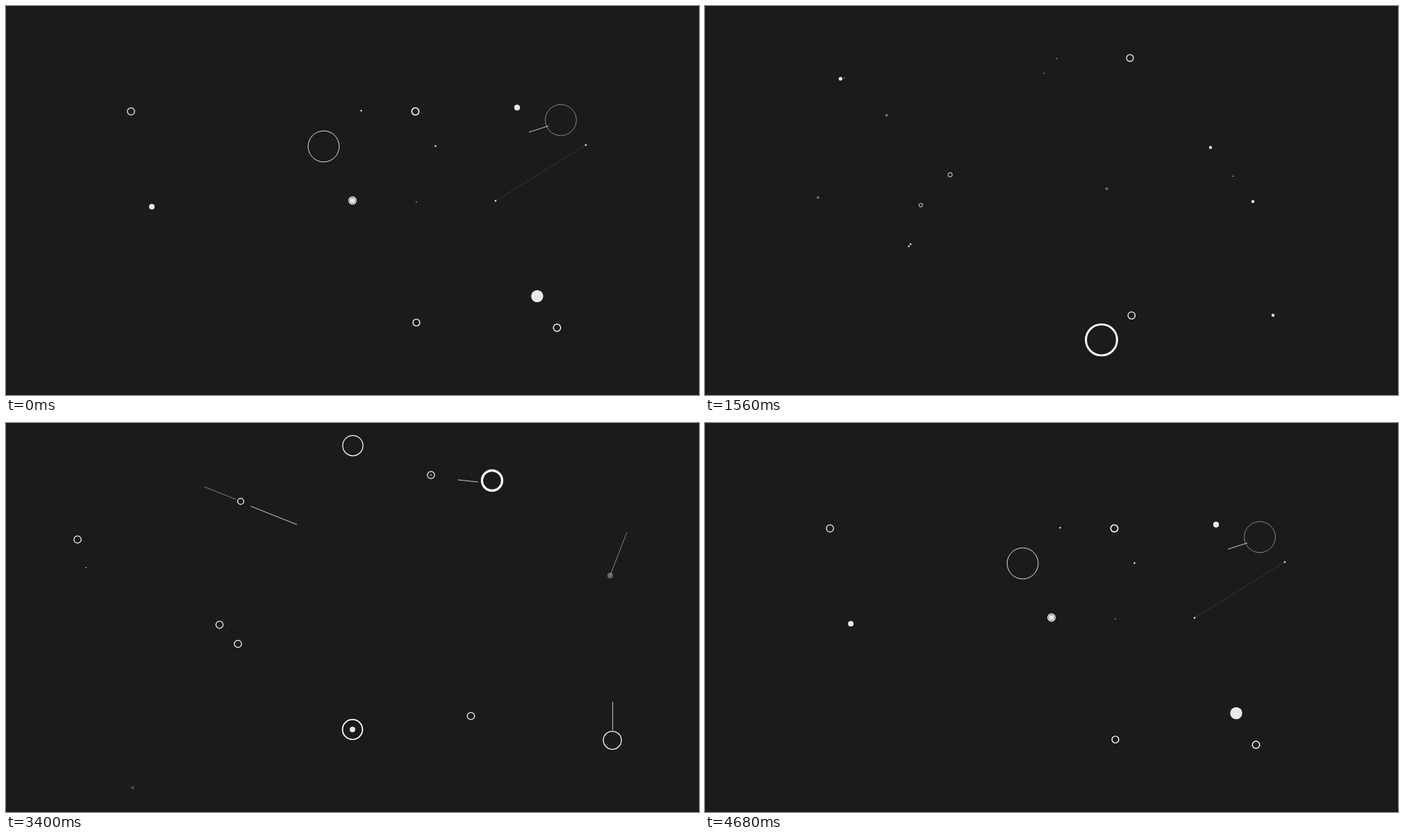
These frames come from a looping animation (998 by 561 pixels, 4.72 s). An HTML page with a canvas:

```html
<!DOCTYPE html>
<html>
<head>
<meta charset="utf-8">
<style>
html, body { margin: 0; height: 100%; overflow: hidden; background: #1b1b1b; }
canvas { display: block; }
</style>
</head>
<body>
<canvas id="stage" width="998" height="561"></canvas>
<script>
const ctx = document.getElementById('stage').getContext('2d');
const STEP = 40, FADE = 120;
// Beats of the loop, in ms
const A = 0, B = 360, C = 1040, D = 1640, E = 2040, END = 2320;
const shapes = [];

const smooth = v => {
  const u = Math.min(1, Math.max(0, v));
  return u * u * (3 - 2 * u);
};
const mix = (a, b, u) => a + (b - a) * u;

function disc(x, y, r, alpha) {
  ctx.beginPath();
  ctx.arc(x, y, r, 0, 2 * Math.PI);
  ctx.globalAlpha = alpha;
  ctx.fillStyle = '#e9e9e9';
  ctx.fill();
}

function hoop(x, y, r, width) {
  if (width < 0.02) return;
  ctx.beginPath();
  ctx.arc(x, y, r, 0, 2 * Math.PI);
  ctx.globalAlpha = 1;
  ctx.strokeStyle = '#fff';
  ctx.lineWidth = width;
  ctx.stroke();
}

// Eases between stops [time, x, y, radius, weight]; omitted values carry over.
// Every shape pops open before its first stop and closes after its last.
function travel(stops, weight, draw) {
  let last = [0, 0, 0, 0, weight];
  const path = stops.map(stop => last = last.map((v, i) => stop[i] ?? v));
  shapes.push(t => {
    const open = smooth((t - path[0][0]) / FADE + 1) * smooth((last[0] - t) / FADE + 1);
    if (!open) return;
    const i = Math.max(0, path.findLastIndex(stop => stop[0] <= t));
    const a = path[i], b = path[i + 1] || a;
    const u = smooth((t - a[0]) / (b[0] - a[0] || 1));
    const [, x, y, r, w] = a.map((v, k) => mix(v, b[k], u));
    draw(x, y, r * open, w, open);
  });
}

const dot = (...stops) => travel(stops, 1, disc);
const ring = (...stops) => travel(stops, 1.25, (x, y, r, w, open) => hoop(x, y, r, w * Math.sqrt(open)));
const node = (x, y, r, from, to = from, width) => ring([from, x, y, r, width], [to]);

// Ring that swells quickly while its stroke thins to nothing
function burst(x, y, start) {
  shapes.push(t => {
    const p = (t - start) / 360;
    if (p > 0 && p < 1) hoop(x, y, 22.4 * smooth(p / 0.45), 3 * smooth(p / 0.45) * (1 - smooth((p - 0.45) / 0.55)));
  });
}

// Line that shoots out to full length at `peak`, then its tail catches up
function streak(x1, y1, x2, y2, peak, width = 1) {
  shapes.push(t => {
    const u = (t - peak) / 180;
    if (Math.abs(u) >= 1) return;
    const tail = smooth(u), head = smooth(u + 1);
    ctx.globalAlpha = 1;
    ctx.strokeStyle = '#ccc';
    ctx.lineWidth = width;
    ctx.beginPath();
    ctx.moveTo(mix(x1, x2, tail), mix(y1, y2, tail));
    ctx.lineTo(mix(x1, x2, head), mix(y1, y2, head));
    ctx.stroke();
  });
}

burst(233, 131, 54);
burst(871, 75, 100);
burst(571, 481.5, 1380);
burst(255.5, 410, 1734);
burst(624.5, 300, 1842);
burst(799, 164.5, 2010);
burst(457.5, 202.5, 2030);

// Large dots
dot([D, 818, 446, 8.7], [E, 845, 460.5], [END, 765, 418.5]);
dot([D, 728, 204, 8.7], [E, 719.5, 193, 6]);
dot([D, 789, 282, 8.7], [E, 801.5, 298, 6]);
dot([B, 118.5, 389.5, 8.7], [B + 260, 80, 388]);
dot([B, 874, 244.5, 8.7], [900, 929, 222]);

// Pair parting along a line
streak(813, 214, 715.5, 275, E, 0.9);
streak(835, 200.5, 705, 281, END, 0.15);
dot([D, 760.5, 245.5, 2.6], [E, 813, 214, 5.2], [END, 835, 200.5, 1.3]);
dot([D, 760.5, 245.5, 2.6], [E, 722, 270.5, 5.2], [END, 705, 281, 1.3]);

// Dots thrown from a hub
dot([A, 736, 146.5, 4], [B, 694.5]);
dot([A, 736, 146.5, 4], [B, 746, 152]);
dot([160, 746, 152, 4], [B, 787, 123.5]);
dot([160, 746, 152, 4], [B, 786.5, 174], [C, 870, 220, 4, 0.37]);

// Medium dots
dot([A, 499, 280.5, 4], [B, 499, 341], [C, 499, 442]);
dot([A, 210, 289.5, 4], [B, 254.5, 363.5]);
dot([E, 722, 396, 4]);
dot([240, 499, 237, 5.3], [B, 523, 236.5]);
dot([D, 296, 343.5, 5], [E, 414, 446]);
dot([D, 293.5, 346.5, 5], [1800, 255.5, 410]);

// Small dots
dot([B, 295.5, 43, 2.6]);
dot([B, 236.5, 71, 2.6]);
dot([C + 74, 115, 208.5, 2.6], [D, 200.5, 98]);
dot([D, 200.5, 104, 2.6], [E, 199, 208]);
dot([D + 74, 502, 73, 2.6], [E, 508, 121], [END, 511.5, 151, 1.2]);
dot([D, 506.5, 76, 2.6], [E, 574, 153], [END, 618.5, 202, 1.3]);
dot([D, 488.5, 97, 2.6], [1920, 457.5, 202.5]);

// Travelling rings
ring([A, 180, 152, 5.2], [B, 270, 129.5], [C, 338, 113, 4.4]);
ring([A, 589.5, 152, 5.2, 1.6], [B, 700, 83, 5.2, 1.25], [C, 700, 83, 14.5, 3.3]);
ring([A, 499, 280.5, 5.3], [B, 499, 237]);
ring([200, 793.5, 464, 5.2], [B, 679, 462.5], [C, 669.5, 422.5], [D, 611.5, 447.5]);
ring([C, 307.5, 291, 5.2], [D, 311, 287, 2.5, 0.8]);
ring([C, 334, 318.5, 5.2], [D, 354, 239.5, 3, 0.9]);
ring([D, 578.5, 263.5, 5.2], [E, 591, 282.5, 4.5], [END, 591, 282.5, 0.8, 0.4]);

// Rings that open and close in place
node(793.5, 464, 5.2, A, B, 1.4);
node(591, 456.5, 4.9, D + 35, END + 260, 1.4);
node(499.5, 32.7, 14.6, B + 48, C);
node(499.5, 32.7, 7.5, B + 74);
node(499, 442, 14.4, C, C, 1.8);
node(873.2, 457.5, 13, B, C);
node(182.5, 526, 14.6, B, C - 96);
node(103, 168, 5.2, C);
node(162.7, 276.3, 4.6, D);
node(612, 75, 5.2, C, D - 96);
node(612, 75, 5.2, C + 84);
node(261.5, 157.5, 5.2, D, E - 83);
node(341.5, 280.5, 26, B, B, 0.9);
node(871, 75, 15, B, B, 0.9);

streak(719.5, 193, 731, 190, E);
streak(753, 182, 781, 173, END);
streak(683, 80.5, 673.5, 78, B, 0.6);
streak(679.5, 85, 651, 82, C);
streak(331, 110, 285.5, 92, C, 0.6);
streak(352.5, 120, 419, 146.5, C);
streak(873.7, 443, 873.7, 402, C);
streak(870, 220, 894, 158, C, 0.6);

const start = performance.now();
function tick() {
  const elapsed = performance.now() - start;
  const t = Math.floor(elapsed % (END + STEP) / STEP) * STEP;
  ctx.globalAlpha = 1;
  ctx.fillStyle = '#1b1b1b';
  ctx.fillRect(0, 0, 998, 561);
  for (const draw of shapes) [t - END, t, t + END].forEach(time => {
    // the closing beat repeats the opening one
    draw(t === END ? time - END : time);
  });
  requestAnimationFrame(tick);
}
tick();
</script>
</body>
</html>
```
